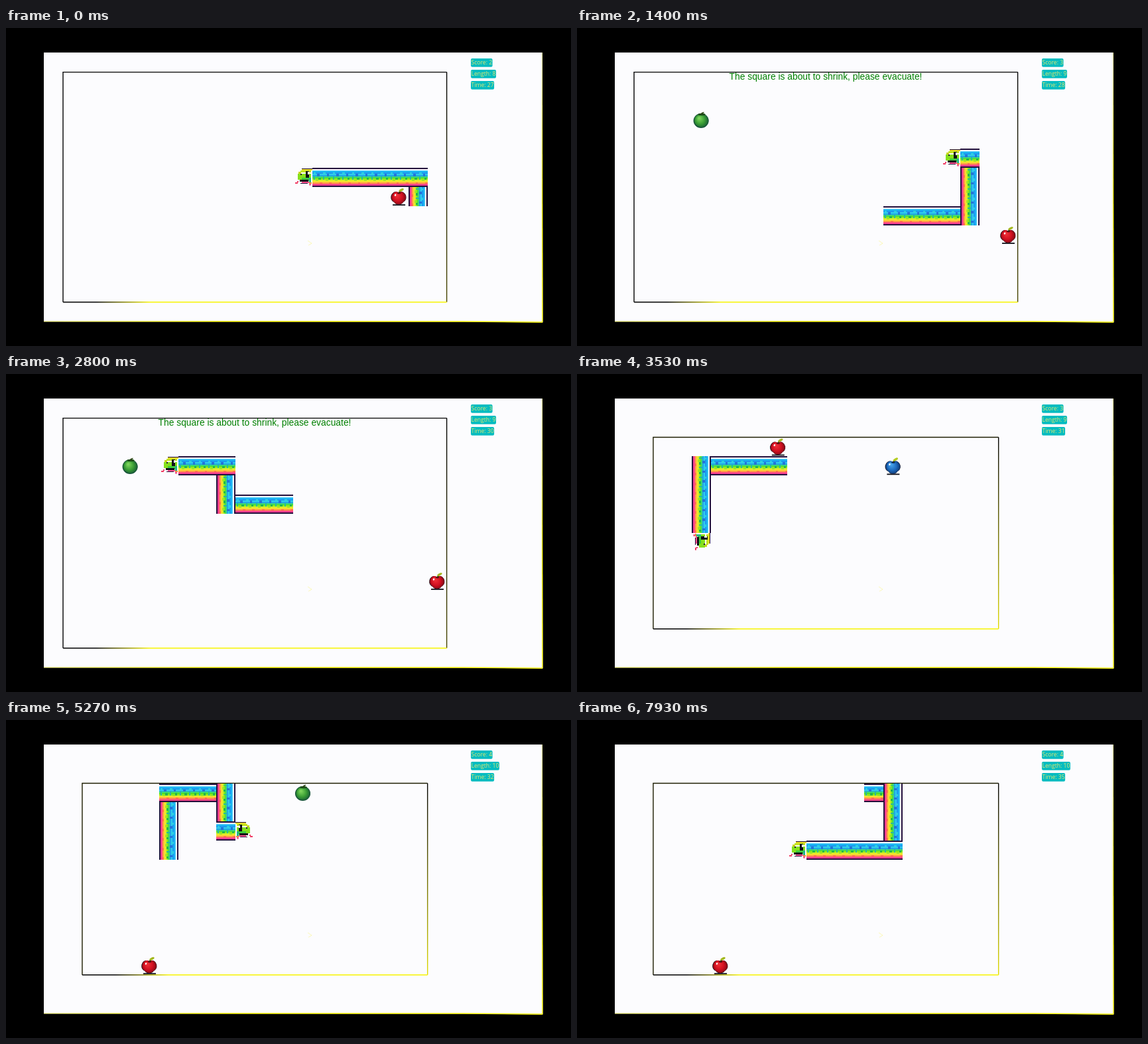
Animation of 852x480 px, one loop 8000 ms. Source, as an HTML page with a canvas:

```html
<!DOCTYPE html>
<html lang="en">
<head>
<meta charset="utf-8">
<title>Snake</title>
<style>
html, body { margin: 0; width: 100%; height: 100%; overflow: hidden; background: #000; }
canvas { display: block; width: 852px; height: 480px; }
</style>
</head>
<body>
<canvas id="stage" width="852" height="480"></canvas>
<script>
const ctx = document.getElementById('stage').getContext('2d');
const LOOP = 8000, CELL = 28.93, LEFT = 86, TOP = 66.6;
const WARN_AT = 450, SHRINK_AT = 3430, CLOCK = 27.55;
const PAPER = '#fcfcfe', YELLOW = '#f8f400', DARK = '#24103c';

// The route of the head, run-length coded; the first START moves lie behind it at time 0.
const ROUTE = 'U1L6 L1D2R6U3L1 L8U2L3 L2D4R2U3 U2R3D2R1 R1U2R3D2 D1L9';
const START = 7;
const STEP = { U: [0, -1], D: [0, 1], L: [-1, 0], R: [1, 0] };
const EAT = { red1: 10, green1: 28, red2: 41, green2: 50 };
const path = walk(18, 6, ROUTE);

function walk(x, y, route) {
  const cells = [];
  for (const [, dir, n] of route.matchAll(/([UDLR])(\d+)/g)) {
    for (let i = 0; i < +n; i++) {
      cells.push({ x, y, dir });
      x += STEP[dir][0];
      y += STEP[dir][1];
    }
  }
  return cells.concat({ x, y, dir: 'L' });
}

// Each green apple makes the snake slower.
const SLOW1 = EAT.green1 * 105;
const SLOW2 = SLOW1 + (EAT.green2 - EAT.green1) * 135;
function movesAt(t) {
  if (t < SLOW1) return Math.floor(t / 105);
  if (t < SLOW2) return EAT.green1 + Math.floor((t - SLOW1) / 135);
  return EAT.green2 + Math.floor((t - SLOW2) / 210);
}

function sprite(paint) {
  const c = document.createElement('canvas');
  c.width = c.height = 32;
  const g = c.getContext('2d');
  g.scale(2, 2);
  paint((color, x, y, w, h) => {
    g.fillStyle = color;
    g.fillRect(x, y, w, h);
  });
  return c;
}

const bodySprite = sprite(box => {
  const bands = [DARK, '#f4f6ff', '#58d4fa', '#1cb4f4', '#1c98f0', '#30ccec', '#20a8e4', '#3cd878',
    '#54e020', '#8cea20', '#d8ee28', '#fadc30', '#ff9c48', '#ff5a78', '#f43c90', DARK];
  bands.forEach((color, y) => box(color, 0, y, 16, 1));
  for (const x of [1, 9]) {
    box('#2cd0dc', x, 4, 2, 1);
    box('#2474d8', x + 3, 5, 2, 2);
    box('#28b8a0', x, 7, 1, 3);
    box('#22b84c', x + 4, 8, 2, 2);
    box('#a4e828', x + 2, 10, 2, 1);
    box('#ff7050', x + 5, 12, 2, 1);
  }
});

const headSprite = sprite(box => {
  box(DARK, 7, 0.5, 9, 0.5);
  box('#e8dc24', 7, 1, 9, 1);
  box('#c4e420', 6, 2, 9, 2);
  box('#c8d41c', 4.5, 3.5, 2, 2);
  box('#86e01c', 4, 5, 11, 5);
  box('#3ccc3c', 7, 8, 8, 3);
  box('#22b48c', 13, 8, 2, 4);
  box(DARK, 6, 5, 1, 1);
  box('#101018', 10.5, 3, 2.5, 5);
  box('#ffffff', 12, 3.5, 1, 2);
  box('#101018', 5.5, 10, 7, 1.5);
  box('#ff5090', 7, 11.5, 6, 1);
  box(DARK, 6, 12.5, 6, 0.7);
  box('#f0903c', 13, 12, 2.5, 1.5);
  box('#f45a90', 13, 13.5, 2, 1.3);
  box('#f03c64', 3.5, 11, 1, 1);
  box('#f03c64', 1.5, 12, 2.5, 1);
});

function corner(x, y) {
  return [LEFT + x * CELL, TOP + y * CELL];
}

function tile(img, cell, turn, flip) {
  const [x, y] = corner(cell.x, cell.y).map(Math.round);
  const [r, b] = corner(cell.x + 1, cell.y + 1).map(Math.round);
  const w = r - x, h = b - y;
  ctx.save();
  ctx.imageSmoothingEnabled = false;
  ctx.translate(x + w / 2, y + h / 2);
  if (turn) ctx.rotate(Math.PI / 2);
  if (flip) ctx.scale(-1, 1);
  const [tw, th] = turn ? [h, w] : [w, h];
  ctx.drawImage(img, -tw / 2, -th / 2, tw, th);
  ctx.restore();
}

function drawSnake(moves, length) {
  const head = START + moves;
  for (let i = head - length + 1; i < head; i++) {
    tile(bodySprite, path[i], 'UD'.includes(path[i].dir), false);
  }
  const dir = path[head - 1].dir;
  tile(headSprite, path[head], 'UD'.includes(dir), 'RD'.includes(dir));
}

function ellipse(color, x, y, rx, ry, tilt = 0) {
  ctx.fillStyle = color;
  ctx.beginPath();
  ctx.ellipse(x, y, rx, ry, tilt, 0, 7);
  ctx.fill();
}

const SKIN = {
  red: ['#f03038', '#d01020', '#700814'],
  blue: ['#48a4ec', '#1c68bc', '#0c2c60'],
  green: ['#7cd45c', '#389c34', '#145038']
};

function drawApple(kind, cx, cy) {
  const [left, top] = corner(cx, cy);
  const x = left + 14.3, y = top + (kind === 'green' ? 15.5 : 16);
  const [light, mid, deep] = SKIN[kind];
  const fill = ctx.createRadialGradient(x - 3, y - 4, 1, x, y, 12);
  fill.addColorStop(0, light);
  fill.addColorStop(0.55, mid);
  fill.addColorStop(1, deep);
  if (kind === 'green') {
    ellipse(deep, x, y, 11.5, 11);
    ellipse(fill, x + 0.5, y - 0.3, 10.8, 10.2);
    ellipse('#1c4c18', x + 1, y - 9.5, 5.5, 1.6);
    ellipse('#304818', x + 2, y - 11.5, 3, 1, -0.5);
    return;
  }
  ctx.fillStyle = '#101018';
  ctx.fillRect(x - 9, y + 10, 19, 1.8);
  for (const [color, grow] of [['#18101c', 0.8], [fill, 0]]) {
    ellipse(color, x - 4 - grow, y - 1, 7, 8, 0.2);
    ellipse(color, x + 4 + grow / 2, y - 1, 7, 8, -0.2);
    ellipse(color, x, y + 3, 8, 7 + grow / 2);
  }
  ellipse(deep, x + 0.5, y - 7, 3, 1.4);
  ellipse('#fff', x - 5, y - 4, 1.2, 1.6, 0.4);
  ellipse('#283010', x + 1.5, y - 9, 1, 3, 0.4);
  ellipse(kind === 'red' ? '#a4b820' : '#b4cc20', x + 4, y - 11.5, 4, 1.8, -0.5);
}

function line(color, width, ...pts) {
  ctx.strokeStyle = color;
  ctx.lineWidth = width;
  ctx.beginPath();
  pts.forEach(([x, y]) => ctx.lineTo(x, y));
  ctx.stroke();
}

function fade(x0, y0, x1, y1, from, to) {
  const g = ctx.createLinearGradient(x0, y0, x1, y1);
  g.addColorStop(0, from);
  g.addColorStop(1, to);
  return g;
}

function drawPage() {
  ctx.fillStyle = '#000';
  ctx.fillRect(0, 0, 852, 480);
  ctx.fillStyle = PAPER;
  ctx.beginPath();
  for (const [x, y] of [[57, 37], [808.5, 37], [809.5, 444.5], [690, 443.5], [57, 443]]) ctx.lineTo(x, y);
  ctx.fill();
  line(fade(57, 0, 330, 0, '#f8f8a0', YELLOW), 1.4, [57, 442.7], [690, 443], [809, 444]);
  line(fade(0, 60, 0, 260, '#f6f6b0', YELLOW), 1.4, [808.2, 37], [808.9, 444]);
  // faint pointer
  line('rgba(250, 240, 80, 0.4)', 1, [455, 321], [461, 325], [456, 328]);
}

function drawFence(small) {
  const inset = small ? 1 : 0;
  const [l, t] = corner(inset, inset);
  const [r, b] = corner(20 - inset, 12 - inset);
  line(small ? '#1c1c00' : '#000', 1.4, [l, b], [l, t], [r, t]);
  line(fade(0, t, 0, b, '#000', small ? '#e0dc00' : '#484600'), 1.4, [r, t], [r, b]);
  line(fade(l + 50, 0, l + 130, 0, '#000', YELLOW), 1.5, [l, b], [r, b]);
}

function drawLabels(score, length, time) {
  ctx.font = '8.6px "Open Sans", sans-serif';
  ctx.textAlign = 'left';
  [`Score: ${score}`, `Length: ${length}`, `Time: ${time}`].forEach((text, i) => {
    const y = 46 + 17 * i;
    ctx.fillStyle = '#04bcc0';
    ctx.beginPath();
    ctx.roundRect(701, y, ctx.measureText(text).width + 1, 12.7, 2);
    ctx.fill();
    ctx.fillStyle = '#e4e870';
    ctx.fillText(text, 701.5, y + 9.2);
  });
}

function draw(t) {
  const moves = movesAt(t), small = t >= SHRINK_AT;
  const ate1 = moves >= EAT.red1, ate2 = moves >= EAT.red2;
  const eaten = ate1 + ate2;

  drawPage();
  drawFence(small);
  if (t >= WARN_AT && !small) {
    ctx.font = '13.85px "Liberation Sans", Arial, sans-serif';
    ctx.textAlign = 'center';
    ctx.fillStyle = '#008000';
    ctx.fillText('The square is about to shrink, please evacuate!', 375, 78);
  }

  if (ate2) drawApple('red', 4, 10);
  else if (small) drawApple('red', 7, 1);
  else if (ate1) drawApple('red', 19, 8);
  else drawApple('red', 17, 6);

  if (ate1 && moves < EAT.green1) drawApple('green', 3, 2);
  if (small && !ate2) drawApple('blue', 13, 2);
  if (ate2 && moves < EAT.green2) drawApple('green', 12, 1);

  drawSnake(moves, 8 + eaten);
  drawLabels(2 + eaten, 8 + eaten, Math.floor(CLOCK + t / 1000));
}

const began = performance.now();
function tick() {
  draw((performance.now() - began) % LOOP);
  requestAnimationFrame(tick);
}
tick();
</script>
</body>
</html>
```
